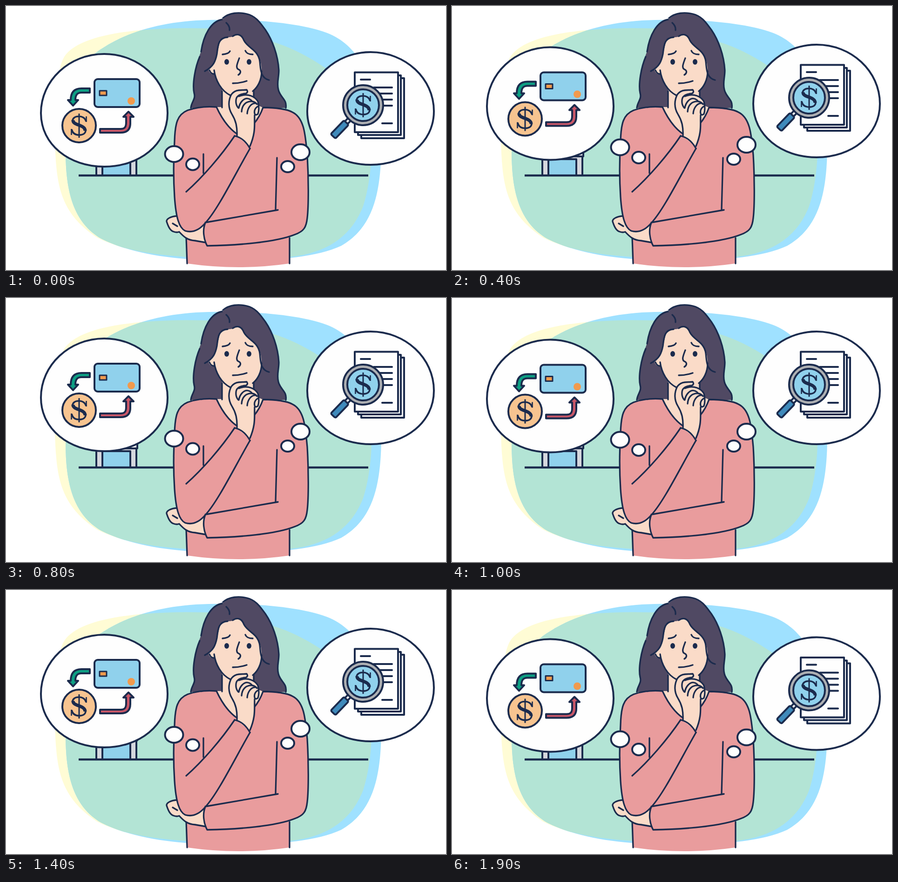
These frames come from a looping animation (945 px wide and 567 px high, 2000 ms). An HTML page:

```html
<!DOCTYPE html>
<html lang="en">
<head>
<meta charset="utf-8">
<title>Thinking about money</title>
<style>
  html, body { margin: 0; width: 100%; height: 100%; overflow: hidden; background: #fff; }
  svg { display: block; width: 945px; height: 567px; }
  .ink { stroke: #1b2b4d; stroke-width: 3.3; stroke-linecap: round; stroke-linejoin: round; }
  .bold { stroke: #1b2b4d; stroke-width: 4; stroke-linejoin: round; }
  .line { fill: none; }
  .skin { fill: #fadbc8; }
  .pink { fill: #e99c9d; }
  .hair { fill: #504963; }
  .paper { fill: #fefefe; }
  .sky { fill: #90d1ec; }
  .round { stroke-linecap: round; }
</style>
</head>
<body>
<svg viewBox="0 0 945 567">
  <defs>
    <path id="blueBlob" d="M435 30C520 28 625 34 690 58C785 95 806 220 806 310C804 400 790 475 720 515C660 543 560 547 470 547C370 546 275 535 205 500C145 465 128 400 128 310C128 200 150 123 210 89C265 54 340 32 435 30Z"/>
    <path id="yellowBlob" d="M300 51C220 57 140 75 122 115C108 145 104 220 105 290C108 390 118 445 195 497C250 525 320 535 388 539H610C690 530 742 495 767 430C780 390 785 340 785 310C782 220 745 170 690 136C650 108 605 85 565 75C520 60 470 47 425 48Q360 46 300 51Z"/>
    <clipPath id="overlap"><use href="#blueBlob"/></clipPath>
    <path id="cloud" class="bold paper" d="M211 103C286 103 347 160 347 230C347 298 286 345 211 345C136 345 75 298 75 230C75 160 136 103 211 103Z"/>
    <g id="dollar" fill="none" stroke="#1b2b4d">
      <path stroke-width="3.6" d="M15-9C13-17 6-20 0-20C-9-20-14-16-14-10C-14-2 14-1 14 10C14 16 9 20 0 20C-8 20-14 17-16 8"/>
      <path stroke-width="7" d="M-13-12C-14 0 13-3 13 11"/>
      <path stroke-width="2.6" d="M15.5-20V-8M-16.5 7V20"/>
      <path stroke-width="3" d="M0-26V26"/>
    </g>
  </defs>

  <use href="#yellowBlob" fill="#fffcd5"/>
  <use href="#blueBlob" fill="#9fe1ff"/>
  <use href="#yellowBlob" fill="#b3e4d5" clip-path="url(#overlap)"/>

  <g class="bold">
    <path fill="#d5d7dd" d="M194 323H280V364H194Z"/>
    <path class="sky" d="M207 329H267V364H207Z"/>
    <path class="paper" d="M192 306H282V323H192Z"/>
    <path stroke-width="4.6" d="M156 364H778"/>
  </g>

  <g class="ink">
    <path class="hair" stroke="none" d="M397 219C398 206 408 200 404 187C400 168 408 125 418 100C422 65 438 33 466 28C480 15 500 13 517 17C538 22 547 38 557 51C572 73 584 105 586 138C586 155 581 165 585 180C589 197 604 200 601 219Z"/>
    <path class="line" d="M397 219C398 206 408 200 404 187C400 168 406 132 416 109M419 98C424 63 440 33 464 29M466 26C480 14 500 13 517 17C538 22 547 38 557 51C572 73 584 105 586 138C586 155 581 165 585 180C589 197 604 200 601 219M473 36Q481 43 480 52"/>
    <path class="skin" stroke="none" d="M464 175V217H452C465 245 480 264 497 276C520 262 540 245 552 218L532 210V175Z"/>
    <path class="line" d="M464 183V218M532 182V208"/>

    <path class="pink" stroke="none" d="M387 485L389 553Q500 569 609 553V485Z"/>
    <path class="line" d="M387 497L389 553M609 498V553"/>
    <path class="skin" d="M367 451C354 452 344 457 345 463C348 472 352 483 361 485Q367 487 372 485C382 496 390 503 406 504L429 508L432 455Z"/>
    <path class="pink" stroke="none" d="M452 217C430 215 410 217 390 224C368 233 363 252 362 290C359 340 360 380 362 410C365 455 372 477 385 483C402 488 417 479 428 466C422 480 424 500 432 515C500 514 580 507 620 491C640 484 645 475 647 455C650 430 650 370 647 320C643 275 640 240 615 228C605 222 580 218 552 218C540 245 520 262 497 276C480 264 465 245 452 217Z"/>
    <path class="line" d="M495 274C478 262 465 245 452 217C430 215 410 217 390 224C368 233 363 252 362 290C359 340 360 380 362 410C365 455 372 477 385 483C402 488 417 479 428 466C455 437 490 365 524 306M387 399C422 368 462 322 491 279M424 318V359M428 465L584 438M582 326L579 437M428 466C422 480 424 500 432 515C500 514 580 507 620 491C640 484 645 475 647 455C650 430 650 370 647 320C643 275 640 240 615 228C605 222 580 218 552 218Q545 238 533 252M358 467L368 473"/>

    <path class="skin" stroke="none" d="M447 138C450 160 462 182 482 192L518 194C538 182 549 162 549 140C549 120 544 105 531 96C515 85 512 72 505 65C498 59 490 61 487 66C478 68 468 66 462 73C456 82 456 100 450 115C446 125 440 130 435 135C435 144 442 147 447 147Z"/>
    <path class="line" d="M447 138C450 160 462 182 482 192M549 140C549 160 540 175 530 183M427 140C446 130 450 118 453 103C455 85 456 68 476 67M487 65C498 57 507 63 511 74C518 87 532 92 539 103C549 117 543 131 550 147Q555 157 565 159M437 138Q440 146 447 146"/>
    <path class="line" d="M465 104Q478 103 481 97M514 96Q517 104 530 104M501 112C496 125 493 133 499 136C506 139 504 145 499 148M487 166Q503 166 517 161"/>
    <g fill="#1b2b4d" stroke="none">
      <ellipse cx="474" cy="120" rx="5" ry="6"/>
      <ellipse cx="522" cy="120" rx="5" ry="6"/>
    </g>

    <path class="skin" stroke="none" d="M496 280C497 258 493 245 485 232C477 219 477 203 484 190Q490 182 500 181L517 180Q521 185 515 188L503 192C520 187 535 195 541 205Q545 222 541 232L534 235C534 255 536 270 524 302Z"/>
    <path class="line" d="M496 279C497 258 493 245 485 232C477 219 477 203 484 190Q490 182 500 181L517 180Q521 185 515 188C500 189 494 195 494 203Q493 212 499 219M500 194C520 186 535 195 541 205Q545 222 541 232Q536 236 534 231Q532 222 540 216M500 219C502 207 511 197 520 199Q525 200 529 205M506 227C507 212 516 204 529 205Q535 206 539 211M518 231C519 218 527 208 537 209M534 234C533 255 537 270 524 301"/>
    <path class="line" d="M491 279Q511 283 524 306"/>
  </g>

  <g id="leftThought" class="bold">
    <use href="#cloud"/>
    <ellipse class="paper" cx="361" cy="318" rx="19.5" ry="17"/>
    <ellipse class="paper" cx="401" cy="340" rx="14" ry="12.5"/>
    <rect class="sky" x="190" y="157" width="97" height="60" rx="7"/>
    <rect x="201" y="182" width="15" height="10" fill="#f19a4d" stroke-width="3"/>
    <circle cx="269" cy="204" r="8" fill="#f19a4d" stroke="none"/>
    <path fill="#0d9f83" d="M180 177H162C146 177 139 186 139 202H133L144 214L155 202H149C149 191 153 186 162 186H180Z"/>
    <path fill="#c95768" d="M202 264H246C255 264 258 260 258 250V238H252L263 227L274 238H267V252C267 265 260 272 246 272H202Z"/>
    <circle cx="157" cy="257" r="36" fill="#f7c490"/>
    <use href="#dollar" x="157" y="257"/>
  </g>

  <g id="rightThought" class="bold">
    <use href="#cloud" x="572" y="-4"/>
    <ellipse class="paper" cx="632.5" cy="314" rx="19.5" ry="17"/>
    <ellipse class="paper" cx="605" cy="345" rx="14" ry="12"/>
    <path class="paper" d="M763 155H855V284H763Z"/>
    <path class="paper" d="M756 149H848V277H756Z"/>
    <path class="paper" d="M749 142.500H842V271H749Z"/>
    <path class="line round" d="M762 158H782M790 175H829M800 188H829M800 201H829M800 214H829M808 252H829"/>
    <g transform="translate(767 213)">
      <g transform="rotate(134)">
        <path class="paper" d="M42-4H53V4H42Z"/>
        <rect x="52" y="-7" width="41" height="14" rx="3" fill="#3f8abb"/>
      </g>
      <circle r="43" fill="#aeb0b3"/>
      <circle class="sky" r="34"/>
      <use href="#dollar"/>
    </g>
  </g>
</svg>
<script>
  const LOOP = 2000, STEP = 100;

  // Vertical drift as [time, offset] points
  const thoughts = [
    ["leftThought", [[0, 0], [200, -8], [400, -14.5], [500, -16.5], [600, -17], [800, -16],
                     [1000, -13.5], [1400, -7], [1600, -3.2], [1900, 2.5], [2000, 0]]],
    ["rightThought", [[0, 0], [200, -8], [400, -16], [600, -23], [700, -25.5], [800, -27], [900, -27.5],
                      [1000, -27], [1200, -22.5], [1400, -16], [1600, -8.8], [1900, 2.5], [2000, 0]]]
  ].map(([id, points]) => ({ node: document.getElementById(id), points }));

  function valueAt(points, time) {
    const next = points.findIndex(([t]) => t > time);
    const [t0, y0] = points[next - 1], [t1, y1] = points[next];
    return y0 + (y1 - y0) * (time - t0) / (t1 - t0);
  }

  function draw() {
    const time = Math.floor(performance.now() % LOOP / STEP) * STEP;
    for (const { node, points } of thoughts)
      node.setAttribute("transform", `translate(0 ${valueAt(points, time)})`);
    requestAnimationFrame(draw);
  }
  draw();
</script>
</body>
</html>
```
